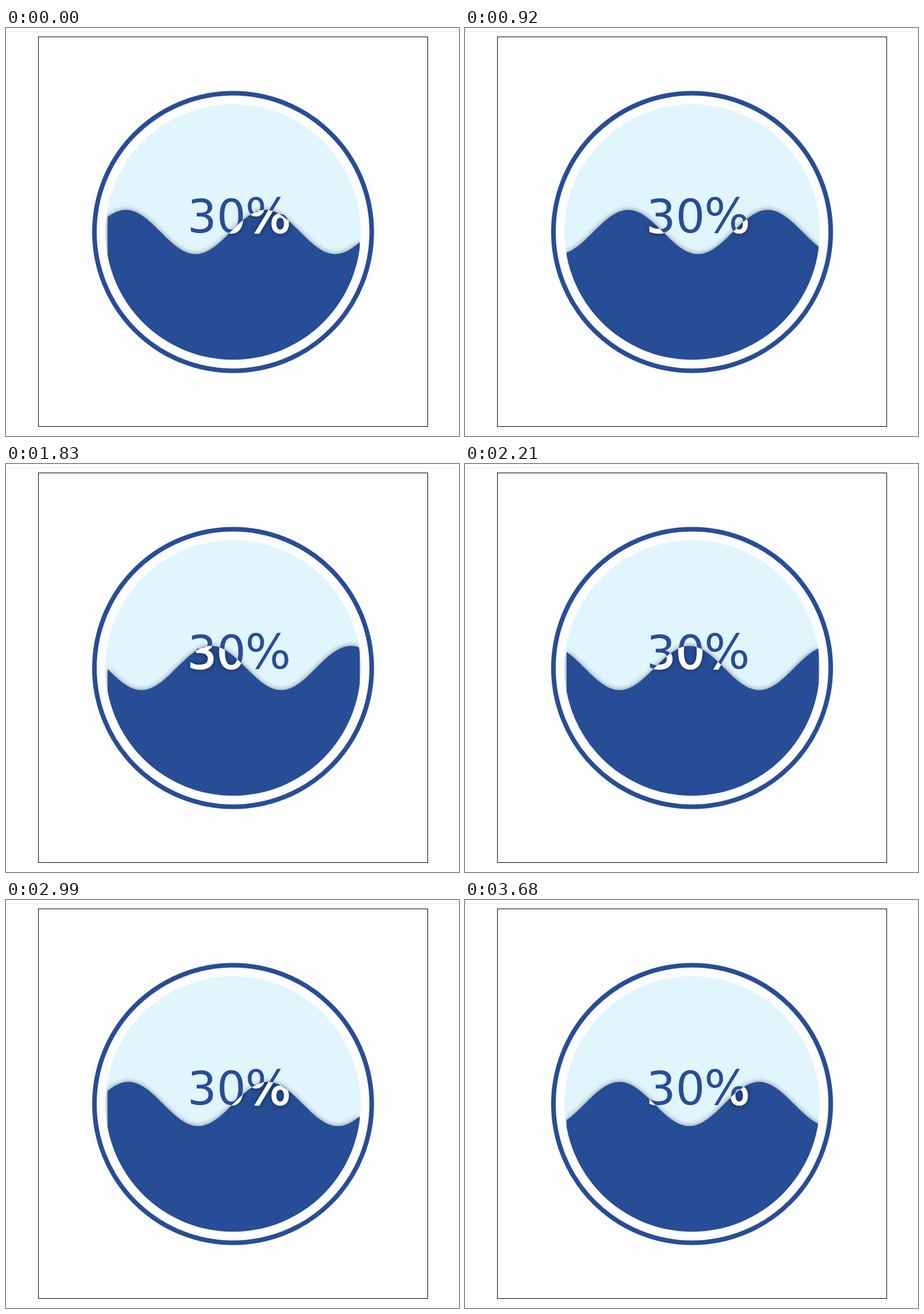
An HTML page for the animation above (3.71 s loop, 789 by 710 pixels).

```html
<!DOCTYPE html>
<html lang="en">
<head>
<meta charset="utf-8">
<title>Liquid gauge</title>
<style>
  html, body { margin: 0; width: 100%; height: 100%; overflow: hidden; background: #fdfdfd; }
  svg { display: block; }
  .wave { animation: drift 3710ms linear infinite; }
  .label { font-family: "DejaVu Sans", sans-serif; font-size: 80px; }
  .label .unit { font-size: 84px; }
  /* one wavelength takes about 2.95 s */
  @keyframes drift {
    0% { transform: translateX(0); }
    15.903% { transform: translateX(48.5px); }
    34.501% { transform: translateX(105px); }
    49.326% { transform: translateX(149px); }
    59.569% { transform: translateX(182.2px); }
    80.593% { transform: translateX(247.7px); }
    99.191%, 100% { transform: translateX(303.7px); }
  }
</style>
</head>
<body>
<svg width="789" height="710" viewBox="0 0 789 710">
  <defs>
    <clipPath id="disc"><circle cx="395.5" cy="355" r="222.3"/></clipPath>
    <clipPath id="band"><rect x="177" y="300" width="438.5" height="290"/></clipPath>
    <clipPath id="water"><path class="wave"/></clipPath>
    <filter id="waveShadow" filterUnits="userSpaceOnUse" x="130" y="260" width="530" height="360">
      <feDropShadow dx="0" dy="0" stdDeviation="5" flood-color="#000" flood-opacity=".45"/>
    </filter>
    <filter id="textShadow" filterUnits="userSpaceOnUse" x="290" y="270" width="240" height="120">
      <feDropShadow dx="0" dy="0" stdDeviation="4" flood-color="#000" flood-opacity=".5"/>
    </filter>
    <text id="value" class="label" y="356">
      <tspan x="316">30</tspan><tspan class="unit" x="416.5">%</tspan>
    </text>
  </defs>

  <path d="M0 6.5H789" stroke="#e6e6e6"/>
  <rect x="56.5" y="15.5" width="678" height="678" fill="none" stroke="#000"/>
  <circle cx="395.5" cy="355" r="241.5" fill="none" stroke="#284d96" stroke-width="8"/>
  <circle cx="395.5" cy="355" r="222.3" fill="#e0f5fc"/>

  <g clip-path="url(#disc)">
    <g filter="url(#waveShadow)">
      <g clip-path="url(#band)"><path class="wave" fill="#284d96"/></g>
    </g>
  </g>

  <use href="#value" fill="#284d96"/>
  <g clip-path="url(#water)">
    <g filter="url(#textShadow)">
      <use href="#value" fill="#fff" stroke="#fff" stroke-width="2"/>
    </g>
  </g>
</svg>
<script>
  const length = 243.2, amp = 38.5, level = 355, crest = 208.5, count = 4;
  const q = length / 4, k = q / Math.PI;

  // Two quarter waves: away from the level and back; dir -1 is up.
  const half = dir => {
    const a = amp * dir;
    return `c${k} ${a / 2} ${2 * k} ${a} ${q} ${a}` +
      `c${k * (Math.PI - 2)} 0 ${k * (Math.PI - 1)} ${-a / 2} ${q} ${-a}`;
  };

  const start = crest - 2 * length - q;
  const d = `M${start} ${level}` + (half(-1) + half(1)).repeat(count) + `V600H${start}Z`;
  document.querySelectorAll('.wave').forEach(p => p.setAttribute('d', d));
</script>
</body>
</html>
```
